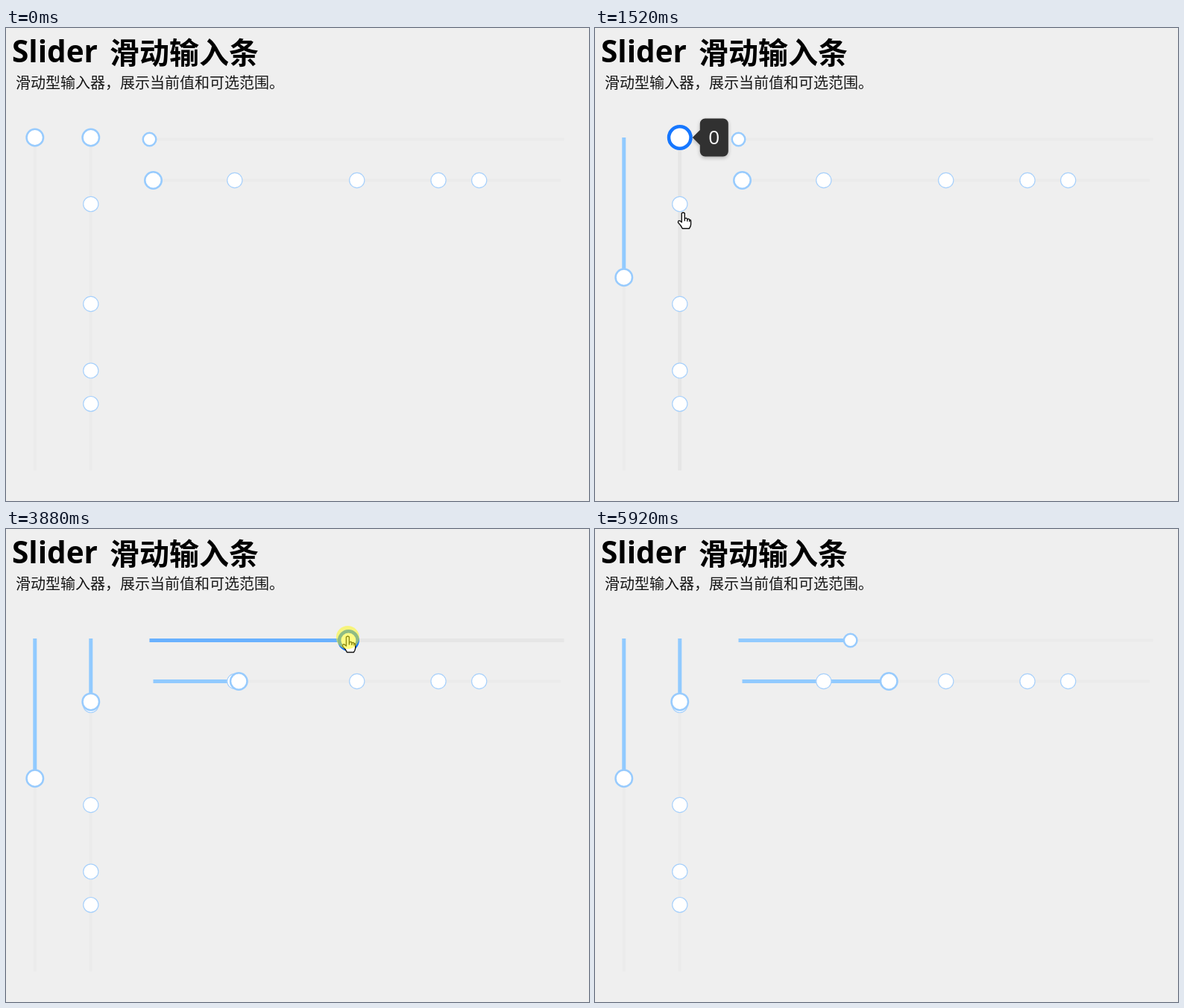
An HTML page with a canvas that plays this animation: 782 px wide and 635 px high, repeating every 6000 ms.

```html
<!DOCTYPE html>
<html lang="zh-CN">
<head>
<meta charset="utf-8">
<title>Slider</title>
<style>
  html, body { margin: 0; width: 100%; height: 100%; overflow: hidden; background: #efefef; }
  svg, canvas { position: absolute; left: 0; top: 0; }
  text { font-family: "Open Sans", "Noto Sans CJK SC", "Noto Sans CJK", sans-serif; }
  .title { font-size: 40px; font-weight: 700; }
  .lead { font-size: 20px; fill: #161616; }
</style>
</head>
<body>
<svg width="782" height="635">
  <text class="title" x="8" y="46" style="font-size: 40.5px">Slider</text>
  <text class="title" x="139" y="47.5">滑动输入条</text>
  <text class="lead" x="13" y="81">滑动型输入器，展示当前值和可选范围。</text>
</svg>
<canvas id="stage" width="782" height="635"></canvas>
<script>
const ctx = document.getElementById('stage').getContext('2d');
const LOOP = 6000, STEP = 80, ENTER = 120, EXIT = 5840;

// aim: where the pointer sits relative to the handle's centre
const marks = [20, 50, 70, 80];
const tall = { x: 38.8, y: 147, len: 447, vertical: true, r: 12.5, tip: true, marks: [], aim: [4.5, -2] };
const tallMarked = { ...tall, x: 113.8, marks };
const wide = { x: 192.5, y: 149.5, len: 556, r: 10, marks: [], aim: [-1, -5.5] };
const wideMarked = { x: 197.5, y: 204.5, len: 546.5, r: 12.5, tip: true, marks, aim: [-1, 3.5] };
const sliders = [tall, tallMarked, wide, wideMarked];

// Pointer trips: a click sets the value at once, a drag carries it along.
const trips = [
  { leave: 120, arrive: 440, on: tall, value: 42, click: 760 },
  { leave: 1000, arrive: 1320, on: tallMarked, value: 23, click: 1680 },
  { leave: 2000, arrive: 2080, on: tallMarked, value: 19, click: 2240 },
  { leave: 2480, arrive: 2640, on: wideMarked, value: 7, click: 2720 },
  { leave: 2960, arrive: 3120, to: [337, 183] },
  { leave: 3160, arrive: 3240, on: wideMarked, value: 21, click: 3240 },
  { leave: 3400, arrive: 3560, on: wide, value: 48, click: 3560 },
  { leave: 3880, arrive: 4080, on: wide, value: 61, drag: true },
  { leave: 4080, arrive: 4320, on: wide, value: 27, drag: true },
  { leave: 4440, arrive: 4680, on: wideMarked, value: 42, click: 5120 },
  { leave: 5200, arrive: 5360, on: wideMarked, value: 48, drag: true },
  { leave: 5440, arrive: 5520, on: wideMarked, value: 36, drag: true },
  { leave: 5600, arrive: 5760, to: [499, 375] }
];

const mix = (a, b, p) => a + (b - a) * p;
const mixRgb = (a, b, p) => `rgb(${a.map((v, i) => Math.round(mix(v, b[i], p)))})`;
const progress = (trip, t) => Math.max(0, Math.min(1, (t - trip.leave) / (trip.arrive - trip.leave)));

function point(s, value) {
  const d = s.len * value / 100;
  return s.vertical ? [s.x, s.y + d] : [s.x + d, s.y];
}

function pointerAt(t) {
  let pos = [276, 585];
  for (const trip of trips) {
    const end = trip.to || point(trip.on, trip.value).map((v, i) => v + trip.on.aim[i]);
    pos = pos.map((v, i) => mix(v, end[i], progress(trip, t)));
  }
  return pos;
}

function valueAt(s, t) {
  let value = 0;
  for (const trip of trips.filter(k => k.on === s)) {
    value = mix(value, trip.value, trip.drag ? progress(trip, t) : +(t >= trip.click));
  }
  return value;
}

const pressed = t => trips.some(k => k.drag ? t >= k.leave && t < k.arrive
                                            : t >= k.click && t < k.click + STEP);

function isNear(s, t) {
  const [dx, dy] = pointerAt(t).map((v, i) => v - (i ? s.y : s.x));
  const [along, across] = s.vertical ? [dy, dx] : [dx, dy];
  return Math.abs(across) < 15 && along > -15 && along < s.len + 15;
}

// Hover fades in and out as the mean over the last moments.
const hoverAt = (s, t) => [0, 40, 80, 120].filter(ago => isNear(s, t - ago)).length / 4;

function line(from, to, width, color) {
  ctx.beginPath();
  ctx.moveTo(...from);
  ctx.lineTo(...to);
  ctx.lineWidth = width;
  ctx.strokeStyle = color;
  ctx.stroke();
}

// r is the outer radius, border included
function ring([x, y], r, border, color) {
  ctx.beginPath();
  ctx.arc(x, y, r - border / 2, 0, 7);
  ctx.fillStyle = '#fff';
  ctx.fill();
  ctx.lineWidth = border;
  ctx.strokeStyle = color;
  ctx.stroke();
}

function drawSlider(s, value, h) {
  const start = point(s, 0), pos = point(s, value);
  line(start, point(s, 100), mix(4, 5, h), mixRgb([235, 235, 235], [230, 230, 230], h));
  if (value) line(start, pos, 5, mixRgb([145, 202, 255], [105, 177, 255], h));
  for (const m of s.marks) ring(point(s, m), 10.7, 1.2, '#a9d1fb');
  const color = mixRgb([152, 203, 253], [22, 119, 255], Math.min(1, h * 2));
  ring(pos, s.r + 4.5 * h, mix(2.5, 4.5, h), color);
}

function drawTip(s, value, h) {
  const [x, y] = point(s, value), label = String(Math.round(value));
  const w = label.length > 1 ? 54 : 38;
  const left = s.vertical ? x + 27 : x - w / 2;
  const top = s.vertical ? y - 25.5 : y - 77.5;
  ctx.save();
  ctx.globalAlpha = h;
  ctx.fillStyle = '#313131';
  ctx.shadowColor = 'rgba(0,0,0,.25)';
  ctx.shadowBlur = 5;
  ctx.shadowOffsetY = 2;
  ctx.beginPath();
  ctx.roundRect(left, top, w, 51, 7);
  if (s.vertical) {
    ctx.moveTo(x + 17, y);
    ctx.lineTo(x + 27, y - 10);
    ctx.lineTo(x + 27, y + 10);
  } else {
    ctx.moveTo(x, y - 16.5);
    ctx.lineTo(x - 10, y - 26.5);
    ctx.lineTo(x + 10, y - 26.5);
  }
  ctx.closePath();
  ctx.fill();
  ctx.shadowColor = 'transparent';
  ctx.globalAlpha = 1;
  ctx.fillStyle = mixRgb([239, 239, 239], [255, 255, 255], h);
  ctx.font = '26px "Open Sans", "Noto Sans", sans-serif';
  ctx.textAlign = 'center';
  ctx.fillText(label, left + w / 2, top + 34);
  ctx.restore();
}

const hand = new Path2D('M-2 1Q0-1 2 1V8Q5 6.5 5.5 9Q8 7.5 8.5 10Q10.3 9 10.3 12V16Q10 19 8 21.5H-1Q-3 17-6.8 13.5Q-7 10-4.5 11L-2 13Z');
const knuckles = new Path2D('M2 8V11.5M5.5 9V12M8.5 10V12.5');

function drawPointer(t) {
  ctx.save();
  ctx.translate(...pointerAt(t));
  ctx.fillStyle = '#fff';
  ctx.strokeStyle = '#111';
  ctx.lineWidth = 1.4;
  ctx.lineJoin = 'round';
  ctx.fill(hand);
  ctx.stroke(hand);
  ctx.stroke(knuckles);
  if (pressed(t)) {
    ctx.beginPath();
    ctx.arc(0, 1.5, 15.5, 0, 7);
    ctx.fillStyle = 'rgba(255,250,20,.52)';
    ctx.fill();
  }
  ctx.restore();
}

// The picture advances in steps whose phase shifts now and then.
function tick(t) {
  const phase = t < 1360 || (t >= 3160 && t < 4400) ? STEP / 2 : 0;
  return Math.floor((t - phase) / STEP) * STEP + phase;
}

function frame(now) {
  const t = tick(now % LOOP);
  ctx.clearRect(0, 0, 782, 635);
  const states = sliders.map(s => [s, valueAt(s, t), hoverAt(s, t)]);
  for (const state of states) drawSlider(...state);
  for (const state of states) if (state[0].tip && state[2] > 0) drawTip(...state);
  if (t >= ENTER && t < EXIT) drawPointer(t);
  requestAnimationFrame(frame);
}
requestAnimationFrame(frame);
</script>
</body>
</html>
```
